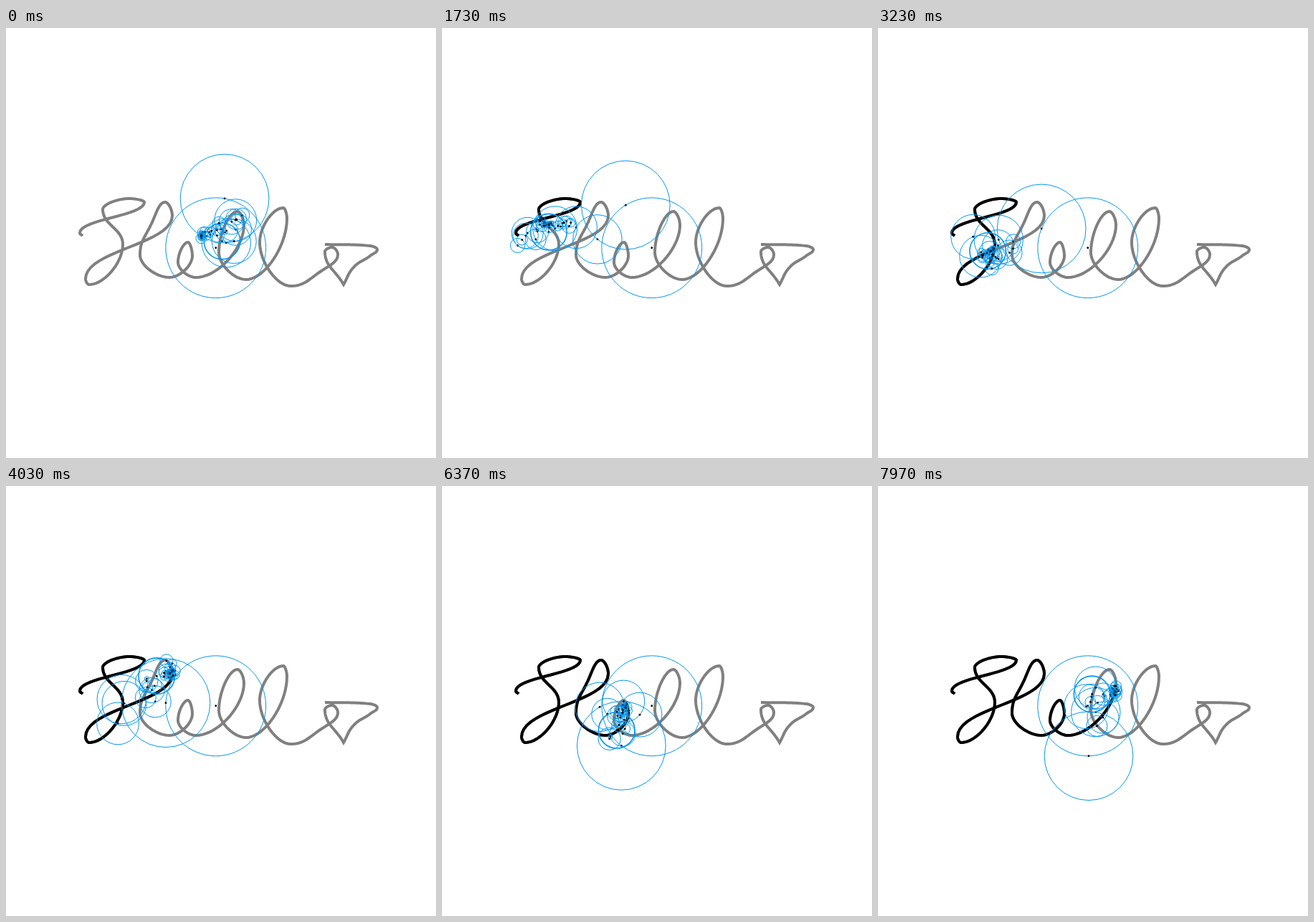
Recreate the animation shown at these times as an HTML page with a canvas. Size 600 by 600 pixels, loop 8000 ms.

```html
<!DOCTYPE html>
<html lang="en">
<head>
<meta charset="utf-8">
<title>Fourier handwriting</title>
<style>
  html, body { margin: 0; width: 100%; height: 100%; overflow: hidden; background: #fff; }
  canvas { display: block; }
</style>
</head>
<body>
<canvas width="600" height="600"></canvas>
<script>
const ctx = document.querySelector('canvas').getContext('2d');
const LOOP_FRAMES = 240, CYCLE_FRAMES = 450;
const HARMONICS = 20, BOLD_HARMONIC = -7;
const HANDLE = .45, STEPS = 20, TAU = 2 * Math.PI;

// Key points of the pen: heading, x, y and, for some, the share of the cycle.
// Headings: v vertical, h horizontal, d along the neighbours' chord.
// A repeated point makes a sharp corner.
const knots = [
  // H
  ['d', 107, 290, 0], ['v', 103, 286], ['v', 193, 243, .068], ['h', 172, 238],
  ['v', 135, 253], ['v', 163, 302], ['h', 116, 358], ['v', 111, 350, .18],
  ['v', 232, 262, .2687], ['h', 222, 243], ['d', 203, 273], ['v', 187, 317, .347], ['h', 228, 348],
  // e
  ['v', 260, 318], ['h', 254, 299, .43], ['v', 240, 327], ['h', 265, 348],
  // l, l
  ['v', 332, 275, .5415], ['h', 323, 256], ['v', 297, 313], ['h', 335, 351],
  ['v', 392, 266], ['h', 387, 251, .71], ['v', 354, 299], ['h', 397, 360],
  // o and its tail
  ['d', 440, 339], ['v', 463, 316], ['h', 455, 306, .855], ['v', 445, 312],
  ['d', 471, 358], ['d', 471, 358], ['d', 485, 334], ['d', 508, 318],
  ['v', 518, 309], ['d', 508, 304], ['d', 445, 302, 1]
].map(([heading, x, y, time]) => ({ heading, x, y, time }));

function direction(i) {
  const a = knots[Math.max(i - 1, 0)], b = knots[Math.min(i + 1, knots.length - 1)];
  const dx = knots[i].heading === 'v' ? 0 : b.x - a.x;
  const dy = knots[i].heading === 'h' ? 0 : b.y - a.y;
  const size = Math.hypot(dx, dy);
  return { x: dx / size, y: dy / size };
}

// Cubic Bezier from knot i to the next one; handles follow the headings.
function segmentPoint(i, u) {
  const a = knots[i], b = knots[i + 1], v = 1 - u;
  const da = direction(i), db = direction(i + 1);
  const reach = d => HANDLE * Math.abs((b.x - a.x) * d.x + (b.y - a.y) * d.y);
  const ra = reach(da), rb = reach(db);
  const mix = axis => a[axis] * v * v * v + 3 * (a[axis] + da[axis] * ra) * v * v * u
    + 3 * (b[axis] - db[axis] * rb) * v * u * u + b[axis] * u * u * u;
  return { x: mix('x'), y: mix('y') };
}

// Dense curve with times; the pen moves evenly between timed knots.
function buildCurve() {
  const curve = [{ x: knots[0].x, y: knots[0].y, t: 0 }];
  let start = 0, length = 0, first = 1;
  for (let i = 0; i < knots.length - 1; i++) {
    for (let s = 1; s <= STEPS; s++) {
      const p = segmentPoint(i, s / STEPS), last = curve[curve.length - 1];
      length += Math.hypot(p.x - last.x, p.y - last.y);
      curve.push({ ...p, t: length });
    }
    const end = knots[i + 1].time;
    if (end === undefined) continue;
    for (const p of curve.slice(first)) p.t = start + (end - start) * p.t / length;
    start = end;
    length = 0;
    first = curve.length;
  }
  return curve;
}

function fourierTerm(curve, k) {
  let re = 0, im = 0;
  for (let i = 1; i < curve.length; i++) {
    const a = curve[i - 1], b = curve[i];
    const dt = b.t - a.t, angle = -TAU * k * (a.t + b.t) / 2;
    const x = (a.x + b.x) / 2 * dt, y = (a.y + b.y) / 2 * dt;
    re += x * Math.cos(angle) - y * Math.sin(angle);
    im += x * Math.sin(angle) + y * Math.cos(angle);
  }
  return { k, re, im, radius: Math.hypot(re, im), phase: Math.atan2(im, re) };
}

const curve = buildCurve();
const center = fourierTerm(curve, 0);
const terms = [];
for (let k = 1; k <= HARMONICS; k++) terms.push(fourierTerm(curve, -k), fourierTerm(curve, k));

function strokeCurve(points, color) {
  ctx.beginPath();
  for (const p of points) ctx.lineTo(p.x, p.y);
  ctx.strokeStyle = color;
  ctx.lineWidth = 4;
  ctx.stroke();
}

function disc(x, y, r) {
  ctx.beginPath();
  ctx.arc(x, y, r, 0, TAU);
}

function drawEpicycles(t) {
  let x = center.re, y = center.im;
  ctx.strokeStyle = '#0096f0';
  ctx.fillStyle = '#000';
  for (const { k, radius, phase } of terms) {
    ctx.lineWidth = k === BOLD_HARMONIC ? 1.6 : 1;
    disc(x, y, radius);
    ctx.stroke();
    disc(x, y, 1.4);
    ctx.fill();
    x += radius * Math.cos(phase + TAU * k * t);
    y += radius * Math.sin(phase + TAU * k * t);
  }
}

function draw(ms) {
  const t = Math.floor((ms + 4) * .03) % LOOP_FRAMES / CYCLE_FRAMES;
  ctx.clearRect(0, 0, 600, 600);
  strokeCurve(curve, '#808080');
  strokeCurve(curve.filter(p => p.t <= t), '#000');
  drawEpicycles(t + .0005);
}

const origin = performance.now();
function tick() {
  draw(performance.now() - origin);
  requestAnimationFrame(tick);
}
tick();
</script>
</body>
</html>
```
